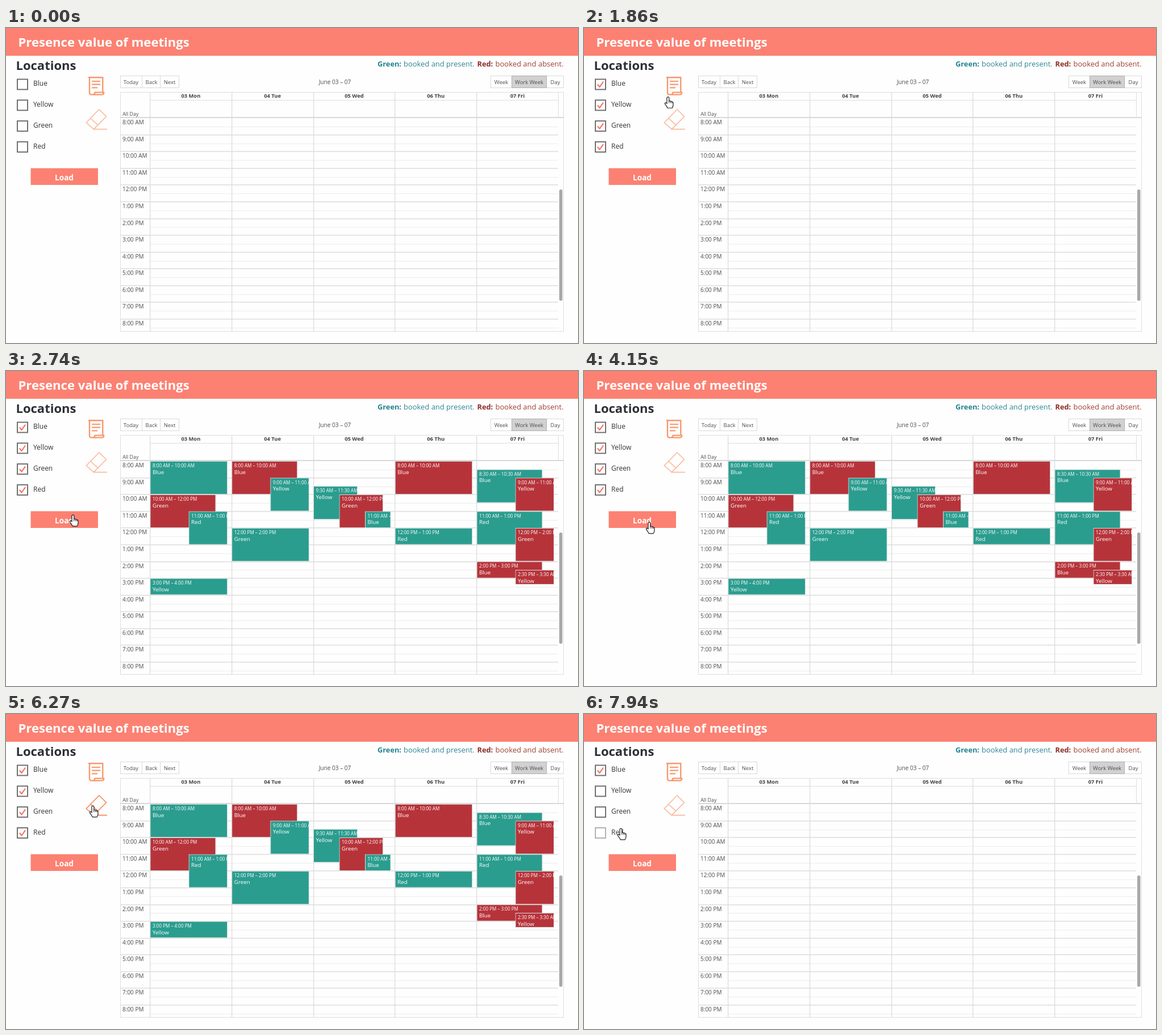
An HTML page for the animation above (8 s loop, 1007 px wide and 556 px high).

```html
<!DOCTYPE html>
<html lang="en">
<head>
<meta charset="utf-8">
<title>Presence value of meetings</title>
<style>
  html, body { margin: 0; width: 100%; height: 100%; overflow: hidden; background: #fefefe; }
  #stage { display: block; width: 1007px; height: 556px; font-family: "Open Sans", "Noto Sans", sans-serif; }
  .off { visibility: hidden; }
  .line { fill: none; stroke-linejoin: round; }
</style>
</head>
<body>
<svg id="stage" viewBox="0 0 1007 556"></svg>
<script>
const LOOP = 8000, TICK = 1000 / 15;
const SALMON = '#fc8172', TEAL = '#2a9d8f', RED = '#b7333a';
const stage = document.getElementById('stage');

function add(parent, tag, attrs) {
  const el = document.createElementNS('http://www.w3.org/2000/svg', tag);
  for (const k in attrs) el.setAttribute(k, attrs[k]);
  parent.appendChild(el);
  return el;
}
const group = () => add(stage, 'g', {});
const rect = (p, x, y, width, height, fill, more) => add(p, 'rect', { x, y, width, height, fill, ...more });
const path = (p, d, stroke, width) => add(p, 'path', { d, stroke, 'stroke-width': width, class: 'line' });
const hline = (x1, x2, y, fill, h = 1) => rect(stage, x1, y, x2 - x1, h, fill);
const vline = (x, y1, y2, fill = '#dedede', w = 1) => rect(stage, x, y1, w, y2 - y1, fill);
function text(p, str, x, y, size, fill, bold, anchor = 'start') {
  add(p, 'text', { x, y, fill, 'font-size': size, 'font-weight': bold ? 700 : 400, 'text-anchor': anchor }).textContent = str;
}
const show = (el, on) => el.classList.toggle('off', !on);

// Header and legend
rect(stage, 0, 0, 1007, 49, SALMON);
text(stage, 'Presence value of meetings', 21.5, 33, 22.1, '#fff', true);
text(stage, 'Locations', 17.5, 74, 22, '#2c2f36', true);
text(stage, 'Green:', 654, 68, 12.8, '#23828f', true);
text(stage, 'booked and present.', 700, 68, 12.95, '#2d8796');
text(stage, 'Red:', 829.5, 68, 12.8, '#8d2c26', true);
text(stage, 'booked and absent.', 861.5, 68, 13, '#a0402f');

// Location list
const boxes = ['Blue', 'Yellow', 'Green', 'Red'].map((name, i) => {
  const y = 90 + i * 36.8;
  const frame = rect(stage, 20, y + 0.5, 18, 18, '#fff', { stroke: '#707070', 'stroke-width': 2 });
  const check = path(stage, `M23.8 ${y + 9.5}l3.7 4.6 6.6-9.4`, '#f8705f', 2.1);
  text(stage, name, 48, y + 12.3, 12, '#333');
  return { frame, check, mid: y + 9 };
});
rect(stage, 43.5, 247.5, 118.5, 29.5, SALMON);
text(stage, 'Load', 102.5, 268.5, 13.6, '#fff', true, 'middle');

// Icons
const script = group();
path(script, 'M145 87.3H170.3V113.5M147 87V113.5Q147 117.6 151 117.6H168.5Q172.3 117.6 172.3 113.6H156.5Q156.5 117.6 152 117.6', 'currentColor', 2.4);
path(script, 'M151 94H166M151 99.7H166M151 105.3H161', 'currentColor', 2.2);
const eraser = group();
path(eraser, 'M164 143.7L176.6 156.3 154.4 178.6 141.3 167ZM149 159.5L161.8 171.2M153 178.6H178', 'currentColor', 1.6);

// Calendar toolbar
function buttons(x, w, dividers, labels) {
  rect(stage, x + 0.5, 84.5, w, 21, '#fff', { stroke: '#d9d9d9' });
  dividers.forEach(d => vline(d, 85, 105, '#d9d9d9'));
  labels.forEach(([str, mid]) => text(stage, str, mid, 98.7, 9.5, '#4c4c4c', false, 'middle'));
}
buttons(201, 103, [239, 271], [['Today', 220], ['Back', 256], ['Next', 288]]);
buttons(853, 128, [], [['Week', 872], ['Day', 967]]);
rect(stage, 890.5, 84.5, 61, 21, '#d1d1d1', { stroke: '#b0b0b0' });
text(stage, 'Work Week', 921, 98.7, 9.5, '#4c4c4c', false, 'middle');
text(stage, 'June 03 – 07', 579, 98.7, 10.1, '#4c4c4c', false, 'middle');

// Calendar grid
const DAY = 143.75, HOUR = 29.57;
const dayX = d => 253.5 + d * DAY;
const hourY = h => 159.2 + (h - 8) * HOUR;
rect(stage, 201.5, 113.5, 780, 422, 'none', { stroke: '#dedede' });
for (let h = 8; h <= 20; h++) {
  const y = Math.round(hourY(h));
  if (h > 8) hline(202, 972, y - 1, '#e0e0e0', 1.6);
  hline(254, 972, Math.round(hourY(h + 0.5)), '#ececec');
  text(stage, `${(h + 11) % 12 + 1}:00 ${h < 12 ? 'AM' : 'PM'}`, 205, hourY(h) + 11, 10, '#4c4c4c');
}
hline(253, 972, 127, '#dedede');
hline(201, 981, 157, '#d8d8d8', 2);
text(stage, 'All Day', 205.3, 155, 8.8, '#4c4c4c');
['03 Mon', '04 Tue', '05 Wed', '06 Thu', '07 Fri'].forEach((name, d) => {
  vline(Math.round(dayX(d) - 0.5), 113, 536, '#dcdcdc', 1.3);
  text(stage, name, dayX(d) + DAY / 2, 123.1, 9.4, '#404040', true, 'middle');
});
vline(972, 113, 158);

// Meetings: day, start, end, left, width, colour, place
const meetings = group();
const clock = h => `${(Math.floor(h) + 11) % 12 + 1}:${h % 1 ? '30' : '00'} ${h < 12 || h > 24 ? 'AM' : 'PM'}`;
[
  [0, 8, 10, 0, 136, TEAL, 'Blue'],
  [0, 10, 12, 0, 115.5, RED, 'Green'],
  [0, 11, 13, 68, 68, TEAL, 'Red'],
  [0, 15, 16, 0, 136, TEAL, 'Yellow'],
  [1, 8, 10, 0, 115.5, RED, 'Blue'],
  [1, 9, 11, 68, 68, TEAL, 'Yellow'],
  [1, 12, 14, 0, 136, TEAL, 'Green'],
  [2, 9.5, 11.5, 0, 77.5, TEAL, 'Yellow'],
  [2, 10, 12, 45.5, 77, RED, 'Green'],
  [2, 11, 12, 91, 45, TEAL, 'Blue'],
  [3, 8, 10, 0, 136, RED, 'Blue'],
  [3, 12, 13, 0, 136, TEAL, 'Red'],
  [4, 8.5, 10.5, 0, 115.5, TEAL, 'Blue'],
  [4, 9, 11, 68, 68, RED, 'Yellow'],
  [4, 11, 13, 0, 115.5, TEAL, 'Red'],
  [4, 12, 14, 68, 68, RED, 'Green'],
  [4, 14, 15, 0, 115.5, RED, 'Blue'],
  [4, 14.5, 27.5, 68, 68, RED, 'Yellow']
].forEach(([day, start, end, left, width, fill, place]) => {
  const height = end > 24 ? 26 : (end - start) * HOUR;
  const card = add(meetings, 'svg', { x: dayX(day) + left, y: hourY(start) - 0.4, width: width + 0.5, height });
  rect(card, 0.5, 0.5, width - 0.5, height - 1, fill, { stroke: '#d3dcda' });
  text(card, `${clock(start)} – ${clock(end)}`, 4.5, 11.2, 8.1, '#fff');
  text(card, place, 4.5, 22.9, 9.8, '#fff');
});
rect(stage, 974, 285, 5.5, 196.5, '#a8a8a8', { rx: 2.7 });

// Pointer
const glow = add(stage, 'circle', { r: 12.5, fill: '#fff028', 'fill-opacity': 0.72 });
const hand = group();
add(hand, 'path', {
  d: 'M-2 1Q-2-.8-.1-.8 1.8-.8 1.8 1V6.5Q4.3 5.7 4.6 7.2 6.6 6.4 7 8 9 7.6 9 9.5V13Q9 16 7.2 18.8H-.8Q-2 16-5.4 11.6-6 9.6-4.2 9.4-3 9.4-2 11Z',
  fill: '#fff', stroke: '#1c1c1c', 'stroke-width': 1.2, 'stroke-linejoin': 'round'
});
path(hand, 'M1.8 6.5V10M4.6 7.5V10M7 8.3V10.5', '#1c1c1c', 1);

// Pointer path: time, x, y
const route = [
  [400, 18, 185], [670, 56, 162], [930, 120, 122], [1130, 149, 104], [1800, 149, 104],
  [1930, 147, 140], [2070, 130, 215], [2200, 118, 255], [3140, 118, 255],
  [3600, 116, 263], [3880, 116, 263], [4130, 115, 268], [5550, 115, 268],
  [5670, 122, 232], [5800, 140, 178], [6000, 140, 178], [6130, 153, 163],
  [6730, 153, 163], [6930, 79, 119], [7130, 66, 105], [7660, 66, 105], [7930, 65, 203], [8000, 65, 203]
];
function pointerAt(t) {
  const q = Math.floor((t + 15) / TICK) * TICK;
  const i = route.findIndex(k => k[0] > q);
  if (i < 0) return route[route.length - 1].slice(1);
  if (i === 0) return route[0].slice(1);
  const [t0, x0, y0] = route[i - 1], [t1, x1, y1] = route[i];
  const u = (q - t0) / (t1 - t0);
  return [x0 + (x1 - x0) * u, y0 + (y1 - y0) * u];
}

const presses = [[1190, 1260], [2480, 2540], [6200, 6270], [7470, 7600]];
const within = (t, a, b) => t >= a && t < b;
const PRESSED = '#1b66b1', HOVER = '#fa8556';

function draw(t) {
  const [x, y] = pointerAt(t);
  const visible = t >= 400;
  const pressed = presses.some(([a, b]) => within(t, a, b));
  const tint = (over, idle) => !(visible && over) ? idle : pressed ? PRESSED : HOVER;

  show(hand, visible);
  show(glow, pressed);
  hand.setAttribute('transform', `translate(${x} ${y})`);
  glow.setAttribute('cx', x);
  glow.setAttribute('cy', y);

  script.style.color = tint(x > 140 && y < 122, '#f9986d');
  eraser.style.color = tint(x > 138 && y > 138 && y < 182, '#fbb89d');
  show(meetings, within(t, 2740, 6340));

  boxes.forEach((b, i) => {
    const hover = visible && x < 110 && Math.abs(y - b.mid) < 18.4;
    b.frame.setAttribute('stroke', hover ? '#9a9a9a' : '#707070');
    b.frame.setAttribute('stroke-width', hover ? 1.5 : 2);
    show(b.check, within(t, 1390, 6340) || (i === 0 && t >= 7600));
  });
}

const begin = performance.now();
function frame() {
  draw((performance.now() - begin) % LOOP);
  requestAnimationFrame(frame);
}
frame();
</script>
</body>
</html>
```
